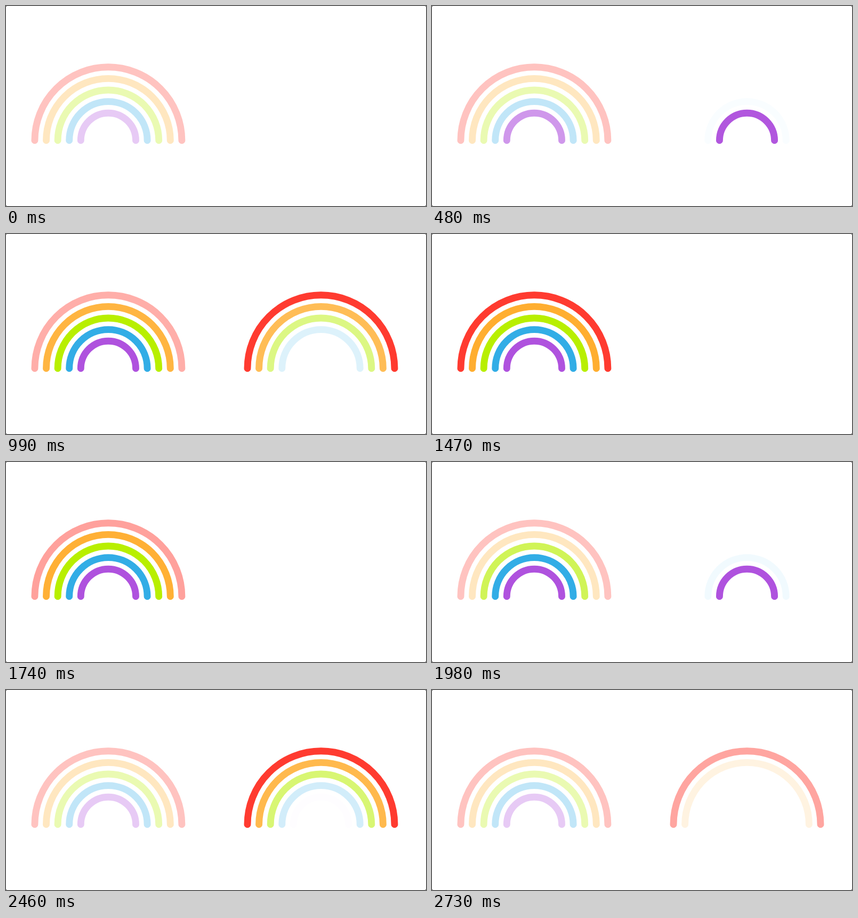
Write an HTML page that moves like this. It is 788 px wide and 376 px high and loops after 2.76 s.

```html
<!DOCTYPE html>
<html lang="en">
<head>
<meta charset="utf-8">
<title>Rainbows</title>
<style>
  html, body { margin: 0; width: 100%; height: 100%; overflow: hidden; background: #000; }
  svg { display: block; width: 788px; height: 376px; background: #fff; border-radius: 2px; }
  path { fill: none; stroke-width: 12.9; stroke-linecap: round; }
</style>
</head>
<body>
<svg id="stage" viewBox="0 0 788 376"></svg>
<script>
const LOOP = 2760;
const DIM = 0.3;
const BASE_Y = 252.8;
// Inner band first
const COLORS = ['#af52de', '#32ade6', '#b8ef00', '#ffae30', '#ff3b30'];

const stage = document.getElementById('stage');

function rainbow(cx) {
  return COLORS.map((color, i) => {
    const r = 51.6 + i * 21.6;
    const band = document.createElementNS('http://www.w3.org/2000/svg', 'path');
    band.setAttribute('d', `M${cx - r} ${BASE_Y}A${r} ${r} 0 0 1 ${cx + r} ${BASE_Y}`);
    band.setAttribute('stroke', color);
    stage.append(band);
    return band;
  });
}

// Eased 0..1 progress from start over the given duration
function ramp(t, start, duration) {
  const x = Math.min(1, Math.max(0, (t - start) / duration));
  return x * x * (3 - 2 * x);
}

// Bands light up from the inside, then dim from the outside
function fillLevel(t, i) {
  const on = ramp(t, 359 + i * 141, 267);
  const off = ramp(t, 1566 + (4 - i) * 143, 260);
  return DIM + (1 - DIM) * (on - off);
}

// A quick rise with a slow fade behind it
function pulse(age) {
  return ramp(age, 0, 150) * (1 - ramp(age, 143, 515));
}

function waveLevel(t, i) {
  const age = t - i * 120;
  return Math.max(pulse(age - 345), pulse(age - 1836));
}

const left = rainbow(191.9);
const right = rainbow(591);

function draw(now) {
  const t = now % LOOP;
  left.forEach((band, i) => { band.style.opacity = fillLevel(t, i); });
  right.forEach((band, i) => { band.style.opacity = waveLevel(t, i); });
}

let begin;
function tick(now) {
  begin ??= now;
  draw(now - begin);
  requestAnimationFrame(tick);
}

draw(0);
requestAnimationFrame(tick);
</script>
</body>
</html>
```
